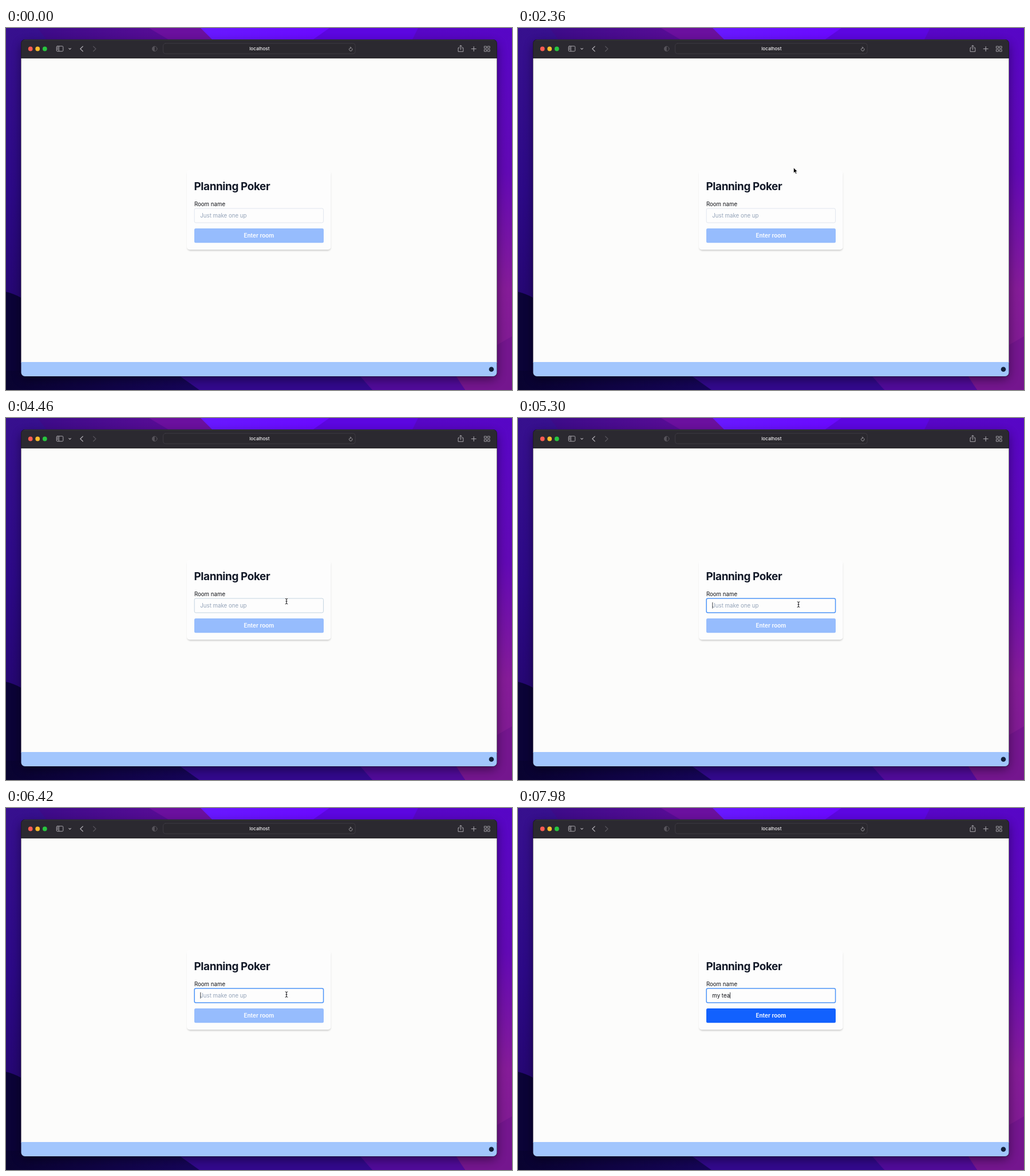
An HTML page for the animation above (8000 ms loop, 884 px wide and 634 px high).

```html
<!DOCTYPE html>
<html lang="en">
<head>
<meta charset="utf-8">
<title>Planning Poker</title>
<style>
  html, body { margin: 0; width: 100%; height: 100%; overflow: hidden; background: #1a0650; }
  svg { display: block; width: 884px; height: 634px; }
  text { font: 9.7px Inter, sans-serif; fill: #111318; white-space: pre; }
  .title { font-size: 18.9px; font-weight: 700; letter-spacing: -.4px; fill: #111827; }
  .button { font-size: 10px; font-weight: 600; fill: #fff; text-anchor: middle; }
  .url { font-size: 8.1px; font-weight: 500; fill: #f4f3f5; text-anchor: middle; }
  .icon { fill: none; stroke: #aaa7ad; stroke-width: 1; stroke-linecap: round; stroke-linejoin: round; }
  .dim { stroke: #56535a; }
</style>
</head>
<body>
<svg viewBox="0 0 884 634">
  <defs>
    <linearGradient id="left" x2="0" y2="1">
      <stop stop-color="#37108e"/><stop offset=".45" stop-color="#2c0986"/><stop offset="1" stop-color="#200562"/>
    </linearGradient>
    <linearGradient id="plum">
      <stop stop-color="#3c0b88"/><stop offset="1" stop-color="#640d9c"/>
    </linearGradient>
    <linearGradient id="violet">
      <stop stop-color="#6819ff"/><stop offset=".4" stop-color="#6a09ff"/><stop offset="1" stop-color="#5806d0"/>
    </linearGradient>
    <linearGradient id="right" x2="0" y2="1">
      <stop stop-color="#5706c6"/><stop offset=".4" stop-color="#6209b4"/>
      <stop offset=".72" stop-color="#851c98"/><stop offset="1" stop-color="#7c1a8e"/>
    </linearGradient>
    <linearGradient id="floor">
      <stop stop-color="#090330"/><stop offset="1" stop-color="#16055a"/>
    </linearGradient>
    <filter id="soft" x="-10%" y="-10%" width="120%" height="120%"><feGaussianBlur stdDeviation="9"/></filter>
    <filter id="lift" x="-10%" y="-10%" width="120%" height="125%"><feGaussianBlur stdDeviation="1.5"/></filter>
    <clipPath id="frame"><rect x="26.5" y="20.5" width="831" height="589.5" rx="6.5"/></clipPath>
  </defs>

  <rect width="884" height="634" fill="url(#left)"/>
  <path d="M55 0H345L380 30H78Z" fill="url(#plum)"/>
  <path d="M250 0H342L372 24H290Z" fill="#6b109f"/>
  <path d="M340 0H884V60H400Z" fill="url(#violet)"/>
  <path d="M565 0H884V60H480Z" fill="#5c06e0"/>
  <path d="M720 0H884V634H840V60H690Z" fill="url(#right)"/>
  <path d="M0 462Q26 468 50 490V634H0Z" fill="#0b0337"/>
  <path d="M0 600H300L338 634H0Z" fill="url(#floor)"/>
  <path d="M290 600H620L640 634H338Z" fill="#32098c"/>
  <path d="M610 600H785L802 634H640Z" fill="#500b99"/>
  <path d="M780 600L884 540V634H802Z" fill="#74168e"/>

  <rect x="27" y="27" width="830" height="588" rx="7" fill="#000" opacity=".48" filter="url(#soft)"/>
  <rect x="26" y="20" width="832" height="590.5" rx="7" fill="#120b20"/>
  <g clip-path="url(#frame)">
    <rect x="26" y="20" width="832" height="33" fill="#2b2930"/>
    <path d="M26 20.8H858" stroke="#59555f" stroke-width=".7"/>
    <rect x="26" y="53" width="832" height="533" fill="#fcfcfb"/>
    <path d="M26 52.8H858" stroke="#141316" stroke-width=".8"/>
    <rect x="26" y="585" width="832" height="26" fill="#a2c6fd"/>
  </g>

  <circle cx="42.7" cy="36.5" r="3.9" fill="#fe5b52"/>
  <circle cx="55.2" cy="36.5" r="3.9" fill="#f8bc2d"/>
  <circle cx="67.8" cy="36.5" r="3.9" fill="#27c63f"/>
  <g class="icon">
    <rect x="88.3" y="31.8" width="11.5" height="9" rx="1.5"/>
    <path d="M92.3 32V40.5M89.8 34.2H90.8M89.8 36H90.8M89.8 37.8H90.8"/>
    <path d="M109.8 35.6L111.6 37.4L113.4 35.6" stroke-width="1.2"/>
    <path d="M134.2 32.2L129.8 36.5L134.2 40.8" stroke-width="1.3"/>
    <path class="dim" d="M152.6 32.2L157 36.5L152.6 40.8" stroke-width="1.2"/>
    <circle class="dim" cx="259.7" cy="36.4" r="4.3"/>
    <path d="M259.7 32.1A4.3 4.3 0 0 0 259.7 40.7Z" fill="#56535a" stroke="none"/>
    <rect x="274.6" y="27" width="335.6" height="18" rx="4" fill="#2a282e" stroke="#403d45" stroke-width=".9"/>
    <path d="M604.7 36A2.8 2.8 0 1 1 602.5 34.6M601.6 33L603.2 34.6L601.6 36.1" stroke-width=".9"/>
    <path d="M792.2 34.7H790V41.3H798.8V34.7H796.6M794.4 38V30.4M792.2 32.4L794.4 30.2L796.6 32.4"/>
    <path d="M813.2 36.5H821.2M817.2 32.5V40.5" stroke-width="1.1"/>
    <path d="M835.8 32H839.4V35.4H835.8ZM841.6 32H845.2V35.4H841.6ZM835.8 37.7H839.4V41.1H835.8ZM841.6 37.7H845.2V41.1H841.6Z" stroke-width=".9"/>
  </g>
  <text class="url" x="442.8" y="39.4">localhost</text>
  <circle cx="848" cy="597.8" r="4.3" fill="#14213a"/>

  <rect x="317" y="252" width="250" height="138" rx="5" fill="#000" opacity=".2" filter="url(#lift)"/>
  <rect x="316" y="249" width="251.5" height="139.3" rx="5" fill="#fdfdfd"/>
  <text class="title" x="328.5" y="283.8">Planning Poker</text>
  <text x="328.9" y="312">Room name</text>
  <rect id="field" x="329.2" y="316" width="225.4" height="25" rx="2.5" fill="#fdfdfd"/>
  <text id="value" x="339.3" y="332"></text>
  <path id="caret" stroke="#22252b" stroke-width=".9"/>
  <rect id="enter" x="329" y="351" width="226" height="25.2" rx="2.5"/>
  <text class="button" x="441.9" y="366.7">Enter room</text>

  <path id="arrow" d="M0 0V9.6L2.3 7.5L3.9 11L5.6 10.2L4.1 6.9H7Z" fill="#000" stroke="#fff" stroke-width=".8"/>
  <g id="beam" fill="none" stroke-linecap="round">
    <path d="M-1.9 -4.8Q0 -4.8 0 -3.4V3.4Q0 4.8 -1.9 4.8M1.9 -4.8Q0 -4.8 0 -3.4M0 3.4Q0 4.8 1.9 4.8M-1 0H1" stroke="#fff" stroke-width="2.2"/>
    <path d="M-1.9 -4.8Q0 -4.8 0 -3.4V3.4Q0 4.8 -1.9 4.8M1.9 -4.8Q0 -4.8 0 -3.4M0 3.4Q0 4.8 1.9 4.8M-1 0H1" stroke="#17171a" stroke-width="1"/>
  </g>
</svg>
<script>
const LOOP = 8000, SHOW = 1900, CLICK = 5300;
const WORD = 'my tea';
const KEYS = [6700, 6960, 7180, 7420, 7620, 7840];
const PATH = [
  [1900, 476, 215], [2360, 481.4, 244.6], [3200, 489, 300],
  [3700, 490, 321], [4460, 490, 321], [5000, 490, 326.6]
];
const el = id => document.getElementById(id);
const field = el('field'), value = el('value'), caret = el('caret');
const enter = el('enter'), arrow = el('arrow'), beam = el('beam');

const set = (node, attrs) => {
  for (const key in attrs) node.setAttribute(key, attrs[key]);
};
const show = (node, on) => set(node, { visibility: on ? 'visible' : 'hidden' });

function pointerAt(t) {
  const i = PATH.findIndex(p => p[0] > t);
  if (i === 0) return PATH[0].slice(1);
  if (i < 0) return PATH[PATH.length - 1].slice(1);
  const [t0, x0, y0] = PATH[i - 1], [t1, x1, y1] = PATH[i];
  const u = (t - t0) / (t1 - t0), k = u * u * (3 - 2 * u);
  return [x0 + (x1 - x0) * k, y0 + (y1 - y0) * k];
}

function draw(t) {
  const count = KEYS.filter(k => k <= t).length;
  const [x, y] = pointerAt(t);
  const over = y >= 316, focused = t >= CLICK;
  const visible = t >= SHOW && !count;

  value.textContent = count ? WORD.slice(0, count) : 'Just make one up';
  value.style.fill = count ? '#111318' : '#94a3b8';
  set(field, {
    stroke: focused ? '#4c94f8' : over ? '#c3d3e0' : '#e0e5ee',
    'stroke-width': focused ? 1.5 : 1
  });
  set(enter, { fill: count ? '#1261fe' : '#96bcfd' });

  const end = count ? value.getComputedTextLength() + .5 : .6;
  set(caret, { d: `M${339.3 + end} 322.8V333.6` });
  show(caret, focused && (count || (t - CLICK) % 1000 < 750));

  const place = { transform: `translate(${x} ${y})` };
  set(arrow, place);
  set(beam, place);
  show(arrow, visible && !over);
  show(beam, visible && over);
}

const start = performance.now();
function tick() {
  draw((performance.now() - start) % LOOP);
  requestAnimationFrame(tick);
}
tick();
</script>
</body>
</html>
```
